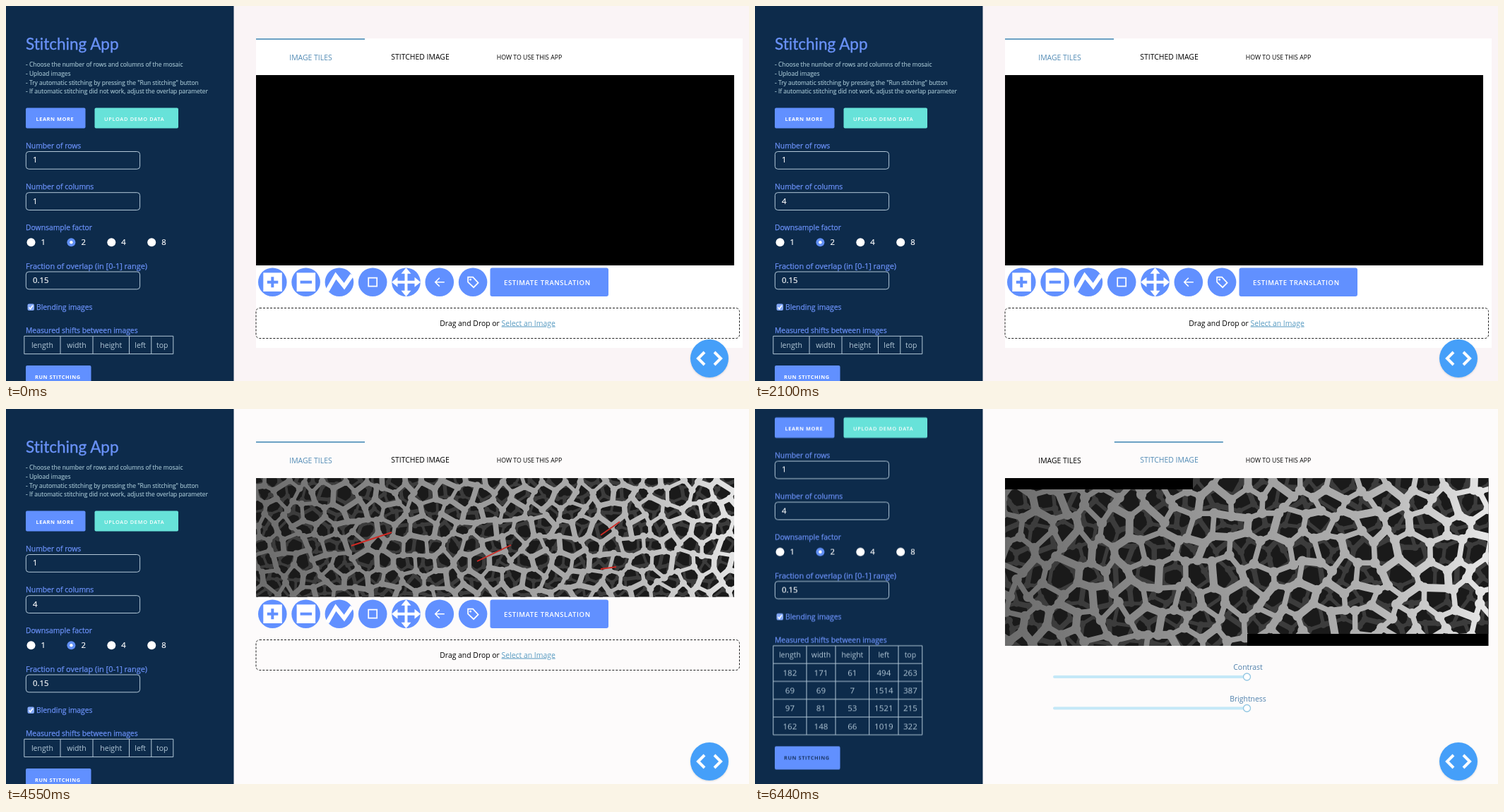
An HTML page that plays this animation: 1052x532 px, repeating every 6510 ms.

```html
<!DOCTYPE html>
<html lang="en">
<head>
<meta charset="utf-8">
<title>Stitching App</title>
<style>
html, body { margin: 0; width: 100%; height: 100%; overflow: hidden; background: #fdfbfb; }
svg { display: block; }
text { font-family: "Open Sans", "Noto Sans", sans-serif; font-variant-ligatures: none; white-space: pre; }
.title { font: 22.5px Lato, sans-serif; font-variant-ligatures: none; fill: #6a92f8; stroke: #6a92f8; stroke-width: .35; }
.label { fill: #6a90f6; stroke: #6a90f6; stroke-width: .25; font-size: 10.35px; }
.note { fill: #a3c3d0; stroke: #a3c3d0; stroke-width: .15; font-size: 8.45px; }
.value { fill: #fff; stroke: #fff; stroke-width: .2; font-size: 11.3px; }
.head { fill: #b4c9d8; font-size: 10.5px; text-anchor: middle; }
.cell { fill: #b4c9d8; font-size: 11.6px; text-anchor: middle; }
.btn { fill: #fff; font-size: 7.4px; font-weight: 700; letter-spacing: .55px; }
.tab { font-size: 10.45px; text-anchor: middle; }
.mid { font-size: 10.42px; text-anchor: middle; }
.box { fill: none; stroke: #b3c8d8; }
.blue { fill: #6190ff; }
.net { fill: none; stroke-linecap: round; stroke-linejoin: round; }

.anim, .line { animation: 6510ms step-end infinite; }
.one { animation-name: one; }
.four { animation-name: four; }
.empty { animation-name: empty; }
.loaded { animation-name: loaded; }
.bare { animation-name: bare; }
.full { animation-name: full; }
.run { animation-name: run; }
.hover { animation-name: hover; }
.tiles { animation-name: tiles; }
.result { animation-name: result; }
.tools { animation-name: tools; }
.tabA { animation-name: tabA; }
.tabB { animation-name: tabB; }
.mark { animation-name: mark; }
.scroll { animation-name: scroll; }
.line { fill: none; stroke: #cf2a24; stroke-width: 1.9; stroke-dasharray: 1 2; }
.l1 { animation-name: l1; }
.l2 { animation-name: l2; }
.l3 { animation-name: l3; }
.l4 { animation-name: l4; }

@keyframes one { 0% { opacity: 1 } 16.13%, to { opacity: 0 } }
@keyframes four { 0% { opacity: 0 } 16.13%, to { opacity: 1 } }
@keyframes empty { 0% { opacity: 1 } 45.16%, to { opacity: 0 } }
@keyframes loaded { 0% { opacity: 0 } 45.16%, to { opacity: 1 } }
@keyframes tools { 0% { transform: none } 45.16%, to { transform: translateY(-101px) } }
@keyframes bare { 0% { opacity: 1 } 76.34%, to { opacity: 0 } }
@keyframes full { 0% { opacity: 0 } 76.34%, to { opacity: 1 } }
@keyframes run { 0% { transform: none } 76.34%, to { transform: translateY(101px) } }
@keyframes hover { 0% { fill: #fff } 84.95%, to { fill: #1b3768 } }
@keyframes tiles { 0% { opacity: 1 } 91.4%, to { opacity: 0 } }
@keyframes result { 0% { opacity: 0 } 91.4%, to { opacity: 1 } }
@keyframes tabA { 0% { fill: #528bb5 } 91.4%, to { fill: #000 } }
@keyframes tabB { 0% { fill: #000 } 91.4%, to { fill: #528bb5 } }
@keyframes mark { 0% { transform: none } 91.4%, to { transform: translateX(154.8px) } }
@keyframes scroll {
  0% { transform: none }
  79.57% { transform: none; animation-timing-function: steps(4) }
  83.87%, to { transform: translateY(-132.5px) }
}
@keyframes l1 { 0% { stroke-dashoffset: 1.01 } 54.84% { stroke-dashoffset: 1.01; animation-timing-function: steps(3) } 58.06%, to { stroke-dashoffset: 0 } }
@keyframes l2 { 0% { stroke-dashoffset: 1.01 } 59.14% { stroke-dashoffset: 1.01; animation-timing-function: steps(2) } 61.29%, to { stroke-dashoffset: 0 } }
@keyframes l3 { 0% { stroke-dashoffset: 1.01 } 62.37% { stroke-dashoffset: 1.01; animation-timing-function: steps(2) } 64.52%, to { stroke-dashoffset: 0 } }
@keyframes l4 { 0% { stroke-dashoffset: 1.01 } 66.67% { stroke-dashoffset: 1.01; animation-timing-function: steps(2) } 68.82%, to { stroke-dashoffset: 0 } }
</style>
</head>
<body>
<svg width="1052" height="532" viewBox="0 0 1052 532">
  <defs>
    <linearGradient id="tone" gradientUnits="userSpaceOnUse" x1="354" x2="1035">
      <stop offset="0" stop-color="#6c6c6c"/>
      <stop offset=".4" stop-color="#969696"/>
      <stop offset=".75" stop-color="#b0b0b0"/>
      <stop offset="1" stop-color="#e6e6e6"/>
    </linearGradient>
    <clipPath id="strip"><rect x="354" y="98" width="677" height="168.5"/></clipPath>
    <clipPath id="mosaic"><path d="M354 114H620V98H1038.500V319H697V336H354Z"/></clipPath>
    <filter id="soft" x="-20%" y="-20%" width="140%" height="150%">
      <feDropShadow dx="0" dy="1" stdDeviation="1" flood-opacity=".15"/>
    </filter>
  </defs>

  <rect width="1052" height="532" fill="#fdfbfb"/>
  <g class="anim empty">
    <rect x="322" width="730" height="532" fill="#faf4f6"/>
    <rect x="354" y="46" width="689" height="439" fill="#fff"/>
  </g>

  <!-- tabs -->
  <rect class="anim mark" x="354" y="46" width="154" height="1.800" fill="#5b97be"/>
  <text class="tab anim tabA" x="431.500" y="76.500">IMAGE TILES</text>
  <text class="tab anim tabB" x="586.500" y="76">STITCHED IMAGE</text>
  <text class="tab" x="741" y="76" style="font-size:8.75px">HOW TO USE THIS APP</text>

  <!-- tile view -->
  <g class="anim tiles">
    <rect class="anim empty" x="354" y="98" width="677" height="270"/>
    <g class="anim loaded" clip-path="url(#strip)" id="photo"></g>
    <path class="line l1" pathLength="1" d="M489 194L546 175"/>
    <path class="line l2" pathLength="1" d="M842 227L864 224"/>
    <path class="line l3" pathLength="1" d="M842 179L869 160"/>
    <path class="line l4" pathLength="1" d="M667 216L715 193"/>
    <g class="anim tools">
      <g id="icons"></g>
      <rect class="blue" x="685.500" y="371.500" width="167.500" height="40.500" rx="3"/>
      <text class="btn" x="705" y="395.500" style="font-size:9.5px;font-weight:600;letter-spacing:.6px">ESTIMATE TRANSLATION</text>
      <rect x="354" y="428.500" width="684.500" height="43" rx="5" fill="none" stroke="#222" stroke-dasharray="3 2"/>
      <text class="mid" x="696" y="453.500">Drag and Drop or <tspan fill="#5a9cc2" text-decoration="underline">Select an Image</tspan></text>
    </g>
  </g>

  <!-- result view -->
  <g class="anim result">
    <rect x="354" y="98" width="684.500" height="238"/>
    <g clip-path="url(#mosaic)" id="stitched"></g>
    <g fill="#4f80ac">
      <text class="mid" x="698" y="370">Contrast</text>
      <text class="mid" x="698" y="414.500">Brightness</text>
    </g>
    <g stroke="#c4e8f7" stroke-width="4" stroke-linecap="round"><path d="M424 380H697M424 424.500H697"/></g>
    <g fill="#fff" stroke="#92c6e2" stroke-width="1.300">
      <circle cx="696.500" cy="380" r="5"/><circle cx="696.500" cy="424.500" r="5"/>
    </g>
  </g>

  <!-- sidebar -->
  <rect width="322.500" height="532" fill="#0d2b4b"/>
  <g class="anim scroll">
    <text class="title" x="28" y="62">Stitching App</text>
    <g id="form"></g>
    <g class="anim one"><text class="value" x="38" y="280.500">1</text></g>
    <g class="anim four"><text class="value" x="38" y="280.500">4</text></g>
    <g class="anim bare" id="bare"></g>
    <g class="anim full" id="full"></g>
    <g class="anim run">
      <rect class="blue" x="28" y="510" width="92.500" height="33" rx="2"/>
      <text class="btn anim hover" x="41" y="528.500">RUN STITCHING</text>
    </g>
  </g>

  <g filter="url(#soft)"><circle cx="996" cy="500" r="27" fill="#449ff9"/></g>
  <path d="M989 491L980 500L989 509M1003 491L1012 500L1003 509" fill="none" stroke="#fff" stroke-width="4"/>
</svg>
<script>
const put = (id, html) => { document.getElementById(id).innerHTML = html; };
const text = (cls, x, y, s, style = '') => `<text class="${cls}" x="${x}" y="${y}" style="${style}">${s}</text>`;
const rect = (cls, x, y, w, h, r) => `<rect class="${cls}" x="${x}" y="${y}" width="${w}" height="${h}" rx="${r}"/>`;

// Form
const notes = [
  '- Choose the number of rows and columns of the mosaic',
  '- Upload images',
  '- Try automatic stitching by pressing the "Run stitching" button',
  '- If automatic stitching did not work, adjust the overlap parameter'
];
let form = notes.map((s, i) => text('note', 28, 86.2 + i * 12.65, s)).join('');
form += rect('blue', 28, 144.5, 84.5, 29, 2) + text('btn', 42.5, 162.7, 'LEARN MORE');
form += '<g fill="#67e2d9">' + rect('', 125.5, 144.5, 118.5, 29, 2) + '</g>'
  + text('btn', 139, 162.7, 'UPLOAD DEMO DATA', 'font-weight:600;letter-spacing:.7px');
form += text('label', 28, 202, 'Number of rows') + text('label', 28, 260, 'Number of columns')
  + text('label', 28, 318.3, 'Downsample factor')
  + text('label', 28, 372.5, 'Fraction of overlap (in [0-1] range)', 'font-size:10.95px')
  + text('label', 43, 431, 'Blending images') + text('label', 28, 464, 'Measured shifts between images');
for (const y of [206.5, 264.7, 377]) form += rect('box', 28.3, y, 161.3, 24.8, 4);
form += text('value', 38, 222.3, '1') + text('value', 38, 393, '0.15');
[1, 2, 4, 8].forEach((n, i) => {
  const x = 35.5 + i * 56.9;
  form += `<circle cx="${x}" cy="335.300" r="6" fill="${i === 1 ? '#6190f5' : '#fff'}"/>` + text('value', x + 14, 339.3, n);
  if (i === 1) form += `<circle cx="${x}" cy="335.300" r="2.200" fill="#fff"/>`;
});
form += '<rect x="30.500" y="422.500" width="9.500" height="9.500" rx="2" fill="#83a8f8"/>'
  + '<path d="M32.500 427.500l2 2.300l3.500-5" fill="none" stroke="#fff" stroke-width="1.500"/>';
put('form', form);

// Table of measured shifts
function table(xs, rows, rowH) {
  const y = 468.3, right = xs[xs.length - 1], bottom = y + rows.length * rowH;
  let d = '';
  for (const x of xs) d += `M${x} ${y}V${bottom}`;
  for (let i = 0; i <= rows.length; i++) d += `M${xs[0]} ${y + i * rowH}H${right}`;
  let out = `<path class="box" d="${d}"/>`;
  rows.forEach((row, i) => row.forEach((v, j) => {
    out += text(i ? 'cell' : 'head', (xs[j] + xs[j + 1]) / 2, y + i * rowH + (i ? 17 : 16.6), v);
  }));
  return out;
}
const heads = ['length', 'width', 'height', 'left', 'top'];
put('bare', table([25.8, 77, 123, 174.5, 205.8, 236.8], [heads], 25.3));
put('full', table([25.8, 73, 114, 161.7, 203, 236.8], [
  heads, [182, 171, 61, 494, 263], [69, 69, 7, 1514, 387], [97, 81, 53, 1521, 215], [162, 148, 66, 1019, 322]
], 25.3));

// Round tool buttons
const plate = '<rect x="-13" y="-13.300" width="26.500" height="26.600" fill="#fff"/>';
const stroke = (d, w, c = '#fff') => `<path d="${d}" fill="none" stroke="${c}" stroke-width="${w}"/>`;
const arrow = [0, 90, 180, 270].map(a => `<path transform="rotate(${a})" d="M-2 0V-12H-7L0-20.500L7-12H2V0Z" fill="#fff"/>`).join('');
const icons = [
  plate + stroke('M-7.500 0H8M0-7.500V7.500', 4, '#6190ff'),
  plate + stroke('M-8 0H8.500', 4, '#6190ff'),
  stroke('M-17 12L-5-9L7 6L18-10', 5.8),
  stroke('M-6-6H6V6H-6Z', 1.7),
  arrow,
  stroke('M7 0H-6M0-6L-6 0L0 6', 1.6),
  stroke('M-7-7H0L7.500 1L1 7.500L-7 0Z', 1.7) + '<circle cx="-3.500" cy="-3.500" r="1.400" fill="#fff"/>'
];
put('icons', icons.map((s, i) =>
  `<g transform="translate(${377.3 + i * 47.3} 391.700)"><circle class="blue" r="20.300"/>${s}</g>`).join(''));

// Porous texture: jittered honeycomb nets, the far one darker than the near one
function foam(x, y, w, h, size, seed) {
  const rnd = () => (seed = (seed * 16807) % 2147483647) / 2147483647;
  const net = (step, width, color) => {
    const rows = Math.ceil(h / step / .86) + 2, cols = Math.ceil(w / step * 2) + 3;
    const jitter = () => (rnd() - .5) * step * .42;
    const at = [];
    for (let i = 0; i < rows; i++) {
      at.push([]);
      for (let j = 0; j < cols; j++) {
        const dy = (i + j) % 2 ? -.14 : .14;
        at[i].push([x + (j - 1) * step / 2 + jitter(), y + ((i - .5) * .86 + dy) * step + jitter()]);
      }
    }
    const xy = p => p.map(v => v.toFixed(1)).join(' ');
    let thin = '', thick = '', knots = '';
    const strut = (a, b) => {
      const d = `M${xy(a)}L${xy(b)}`;
      if (rnd() < .6) thin += d; else thick += d;
    };
    for (let i = 0; i < rows; i++) for (let j = 0; j < cols; j++) {
      if (j + 1 < cols) strut(at[i][j], at[i][j + 1]);
      if (i + 1 < rows && (i + j) % 2 === 0) strut(at[i][j], at[i + 1][j]);
      knots += `M${xy(at[i][j])}h.01`;
    }
    const layer = (d, k) => `<path class="net" d="${d}" stroke="${color}" stroke-width="${width * k}"/>`;
    return layer(thin, 1) + layer(thick, 1.45) + layer(knots, 1.9);
  };
  return `<rect x="${x}" y="${y}" width="${w}" height="${h}" fill="#1a1a1a"/>`
    + net(size * .8, size * .13, '#3c3c3c') + net(size, size * .19, 'url(#tone)');
}
put('photo', foam(354, 98, 677, 168.5, 28, 77));
put('stitched', foam(354, 98, 684.5, 238, 40, 41));
</script>
</body>
</html>
```
